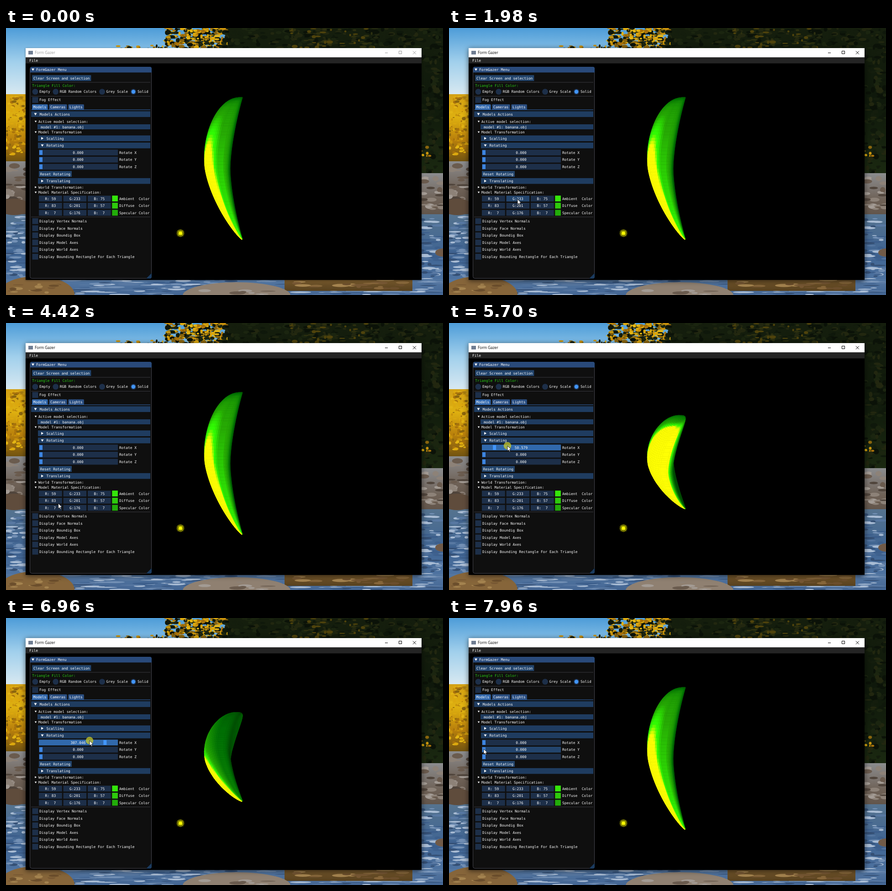
Animation of 957 by 585 pixels, one loop 8 s. Source, as an HTML page with a canvas:

```html
<!DOCTYPE html>
<html lang="en">
<head>
<meta charset="utf-8">
<title>Form Gazer</title>
<style>
html, body { margin: 0; width: 100%; height: 100%; overflow: hidden; background: #000; }
canvas, svg { position: absolute; left: 0; top: 0; }
text { font: 7.89px "DejaVu Sans Mono", monospace; white-space: pre; }
text.title { font: 8.2px "Open Sans", sans-serif; }
.window { filter: drop-shadow(0 1px 2px rgba(0,0,0,.4)); }
.window.on { filter: drop-shadow(0 2px 6px rgba(0,0,0,.6)); }
</style>
</head>
<body>
<canvas id="photo" width="957" height="585"></canvas>
<svg id="ui" width="957" height="585"></svg>
<canvas id="scene" width="957" height="585"></canvas>
<script>
const LOOP = 8000, TICK = 30, LAG = 120, FOCUS = 1400;
const PRESS = 5200, RELEASE = 7720, DEG = .457;
const $ = id => document.getElementById(id);
const clamp = (v, lo, hi) => Math.max(lo, Math.min(hi, v));

// ---------- landscape behind the window ----------
const bg = $('photo').getContext('2d');
let seed = 7;
const rnd = () => (seed = seed * 16807 % 2147483647) / 2147483647;

function fade(x, y, w, h, ...colors) {
  const grad = bg.createLinearGradient(0, y, 0, y + h);
  colors.forEach((c, i) => grad.addColorStop(i / (colors.length - 1), c));
  bg.fillStyle = grad;
  bg.fillRect(x, y, w, h);
}
function blob(x, y, rx, ry, color) {
  bg.fillStyle = color;
  bg.beginPath();
  bg.ellipse(x, y, rx, ry, 0, 0, 7);
  bg.fill();
}
// fills an area with random blobs, about `cover` times over
function scatter(x, y, w, h, rx, ry, colors, cover = 1) {
  for (let n = cover * w * h / (rx * ry * 3); n > 0; n--)
    blob(x + rnd() * w, y + rnd() * h, rx * (.3 + rnd()), ry * (.3 + rnd()),
      colors[Math.floor(rnd() * colors.length)]);
}
function drawPhoto() {
  const gold = ['#c8920c', '#dca80e', '#a8720c', '#e2b414', '#8a650e'];
  const dark = ['#0b1208', '#141d0d', '#1b2510', '#0f180b', '#222710'];
  const stone = ['#8d8278', '#a39b94', '#6a5b4e', '#50453c'];
  const water = ['#7390b5', '#3d5f8c', '#a9bcd4', '#5878a2', '#344f74'];
  const brown = ['#a4834f', '#765733', '#86663a', '#6b4e2c'];
  bg.filter = 'blur(.7px)';

  fade(0, 0, 957, 150, '#4d9cd8', '#a2d0ec', '#dbeaf1');
  fade(480, 0, 477, 325, '#151e0d', '#0f190b', '#1b2911');
  scatter(350, 0, 135, 46, 6, 4, gold.concat(dark), 3);
  scatter(385, 0, 90, 28, 5, 3, gold, .6);
  scatter(235, 38, 110, 8, 4, 3, gold.concat(dark), .8);
  scatter(480, 0, 477, 44, 7, 4, dark, 1);
  scatter(620, 0, 190, 44, 6, 3, ['#4f430c', '#2d3010'], .4);
  scatter(910, 44, 47, 275, 7, 5, dark, 1);
  scatter(910, 252, 18, 30, 4, 3, gold, .5);

  fade(0, 145, 44, 150, '#d2a015', '#deb010', '#b9800c', '#6d5010');
  scatter(0, 150, 44, 130, 4, 3, gold, .8);
  for (const x of [0, 909]) {
    fade(x, x ? 318 : 292, 48, 120, '#8b8c8e', '#6e6156', '#56493f');
    scatter(x, x ? 325 : 300, 48, 75, 11, 5, stone, 1);
    fade(x, 408, 48, 177, '#55738f', '#3f6493', '#587ca8');
    scatter(x, 412, 48, 170, 12, 2.5, water, .8);
  }
  blob(18, 392, 34, 18, '#5f4c3c');
  blob(956, 492, 16, 9, '#705a48');

  fade(0, 550, 957, 35, '#5578a2', '#446694');
  scatter(130, 552, 827, 33, 22, 2, water, .9);
  blob(66, 584, 84, 40, '#86653a');
  scatter(5, 560, 120, 25, 12, 3, brown, .7);
  fade(610, 550, 280, 26, '#76582c', '#57411f');
  scatter(620, 552, 260, 22, 16, 3, brown, .6);
  blob(505, 586, 118, 29, '#8f8071');
  scatter(430, 568, 150, 17, 14, 3, stone, .4);
}

// ---------- window and panel ----------
const FRAME = '#1d2f49', HOVER = '#23456d', ACTIVE = '#3169ac', HEADER = '#1f3c60', BLUE = '#4296fa';
const hot = [], chrome = [];

function add(tag, attrs, content) {
  const e = document.createElementNS('http://www.w3.org/2000/svg', tag);
  for (const k in attrs) e.setAttribute(k, attrs[k]);
  if (content) e.textContent = content;
  $('ui').append(e);
  return e;
}
const rect = (x, y, width, height, fill, more) => add('rect', { x, y, width, height, fill, ...more });
const label = (s, x, cy, fill = '#fff', more) => add('text', { x, y: cy + 2.8, fill, ...more }, s);
const centred = (s, x, cy) => label(s, x, cy, '#fff', { 'text-anchor': 'middle' });
const line = (d, stroke) => add('path', { d, stroke, fill: 'none' });
const rule = y => line(`M55 ${y}H316`, '#38383f');

function arrow(x, cy, open, r = 3) {
  const d = open ? `M${x - r} ${cy - r * .8}h${2 * r}l${-r} ${r * 1.7}z`
                 : `M${x - r * .8} ${cy - r}v${2 * r}l${r * 1.7} ${-r}z`;
  add('path', { d, fill: '#fff' });
}
function field(x, cy, w, base = FRAME, over = HOVER) {
  const e = rect(x, cy - 6.4, w, 12.8, base);
  hot.push({ e, x, y: cy - 6.4, w, base, over });
  return e;
}
function header(s, x, cy, open) {
  rect(x, cy - 6.3, 316 - x, 12.6, HEADER);
  arrow(x + 9.5, cy, open);
  label(s, x + 18.5, cy);
}
function node(s, cy, open) {
  arrow(65, cy, open, 2.2);
  label(s, 71, cy);
}
function check(s, cy) {
  field(57.5, cy, 13);
  label(s, 73, cy);
}
function button(s, x, cy, w) {
  field(x, cy, w, HOVER, ACTIVE);
  label(s, x + 2.7, cy);
}

const frame = rect(43, 44, 867, 508, '#000', { class: 'window' });
rect(43, 44, 867, 20.5, '#fff');
rect(49, 50, 10, 8, '#6f7d92');
chrome.push([label('Form Gazer', 63, 54, '#999', { class: 'title' }), 'fill']);
for (const d of ['M830 54.5h6', 'M860.5 50.5h6v6h-6z', 'M891 50.5l7 7M898 50.5l-7 7'])
  chrome.push([line(d, '#999'), 'stroke']);
rect(43, 64.5, 867, 13, '#242424');
label('File', 51, 71);

rect(52.5, 85.5, 266, 463, '#0f0f0f', { rx: 4, stroke: '#45454e' });
add('path', { d: 'M53 97.5V89q0-4 4-4H315q4 0 4 4V97.5z', fill: '#294a7a' });
add('path', { d: 'M319 537V545q0 4-4 4H307z', fill: '#1b3b5f' });
arrow(59, 91.2, true);
label('FormGazer Menu', 66, 91.2);
button('Clear Screen and selection', 57.3, 109.7, 129);
rule(119);
label('Triangle Fill Color:', 57.3, 126, '#2ad411');
let cx = 64;
for (const s of ['Empty', 'RGB Random Colors', 'Grey Scale', 'Solid']) {
  add('circle', { cx, cy: 139.6, r: 6.4, fill: FRAME });
  if (s === 'Solid') add('circle', { cx, cy: 139.6, r: 4.3, fill: BLUE });
  label(s, cx + 9, 139.6);
  cx += s.length * 4.75 + 21;
}
rule(149.5);
check('Fog Effect', 157.6);
let tabX = 57;
for (const s of ['Models', 'Cameras', 'Lights']) {
  const w = s.length * 4.75 + 6;
  rect(tabX, 167.3, w, 12, s === 'Models' ? '#3369ad' : '#2a4e81', { rx: 1.5 });
  label(s, tabX + 2.7, 173.4);
  tabX += w + 2.8;
}
line('M55 179.2H316', '#3369ad');
header('Models Actions', 55, 188.7, true);
node('Active model selection:', 205, true);
rect(69, 211, 247, 11, HEADER);
label('model #1: banana.obj', 76, 216.8);
node('Model Transformation', 228.3, true);

const ROW = 15.6;
header('Scalling', 70, 241.7, false);
header('Rotating', 70, 257.3, true);
const [spin] = ['X', 'Y', 'Z'].map((axis, i) => {
  const cy = 272.8 + i * ROW;
  const box = field(72, cy, 173);
  const grab = rect(73, cy - 5.2, 7, 10.4, '#3d85e0');
  label('Rotate ' + axis, 248, cy);
  return { box, grab, value: centred('0.000', 158, cy) };
});
button('Reset Rotating', 72, 319.7, 72);
header('Translating', 70, 335.2, false);
node('World Transformation:', 348.8, false);
node('Model Material Specification:', 360.2, true);
[['R: 59', 'G:233', 'B: 75', 'Ambient  Color', '#34e60a'],
 ['R: 83', 'G:201', 'B: 57', 'Diffuse  Color', '#2dca0c'],
 ['R:  7', 'G:176', 'B:  7', 'Specular Color', '#22ac0a']].forEach((row, i) => {
  const cy = 373.8 + i * ROW;
  for (let c = 0; c < 3; c++) {
    field(72 + c * 53.5, cy, 50.7);
    centred(row[c], 97.3 + c * 53.5, cy);
  }
  rect(232.3, cy - 6.6, 12.6, 12.8, row[4]);
  label(row[3], 248, cy);
});
rule(414);
['Vertex Normals', 'Face Normals', 'Boundig Box', 'Model Axes', 'World Axes', 'Bounding Rectangle For Each Triangle']
  .forEach((s, i) => check('Display ' + s, 423.1 + i * ROW));

// ---------- pointer: time, x, y at the turning points ----------
const path = [
  [500, 794, 505], [1050, 90, 250], [1500, 116, 372], [1980, 150, 375], [2500, 95, 378],
  [3200, 204, 388], [3450, 206, 404], [4100, 102, 404], [4420, 115, 395], [4900, 76, 271],
  [5400, 77, 270], [5580, 99.1146, 270], [5700, 128, 269], [5970, 156, 268], [6210, 224.2042, 267],
  [6330, 251, 266], [6690, 258, 267], [7230, 107.9521, 270], [7350, 93, 270], [7650, 53, 272],
  [7720, 53, 272], [7860, 76, 287], [LOOP, 76, 287]
];
function pointer(t) {
  const i = path.findIndex(p => p[0] > t);
  if (!i) return [-99, -99];
  const a = path[i - 1], b = path[i], k = (t - a[0]) / (b[0] - a[0]);
  return [a[1] + (b[1] - a[1]) * k, a[2] + (b[2] - a[2]) * k];
}

// ---------- banana: horizontal sections, round on the left, boxy on the right ----------
const MID = 307.5, RINGS = 64, SIDES = 44;
const bend = (v, p) => Math.sign(v) * Math.abs(v) ** p;

function vertex(i, j) {
  const v = (1 - Math.cos(Math.PI * i / RINGS)) / 2, a = j / SIDES * 2 * Math.PI;
  const inner = 491 + 27 * Math.abs(2 * v - 1) ** 1.6;
  const half = 1 + 61.5 * v ** .4 * (1 - v) ** .8;
  const p = Math.cos(a) > 0 ? .4 : 1;
  return [inner - half + half * bend(Math.cos(a), p), 311 * v - 155.5, half * bend(Math.sin(a), p)];
}
const quads = [];
for (let i = 0; i < RINGS; i++)
  for (let j = 0; j < SIDES; j++) {
    const p = [vertex(i, j), vertex(i, j + 1), vertex(i + 1, j + 1), vertex(i + 1, j)];
    const [u, v] = [0, 1].map(k => p[k + 2].map((c, m) => c - p[k][m]));
    const n = [u[1] * v[2] - u[2] * v[1], u[2] * v[0] - u[0] * v[2], u[0] * v[1] - u[1] * v[0]];
    const a = (j + .5) / SIDES * 2 * Math.PI;
    const size = Math.hypot(...n) * Math.sign(n[0] * Math.cos(a) + n[2] * Math.sin(a)) || 1;
    quads.push({ p, n: n.map(c => c / size) });
  }

const LIGHT = [-.62, .62, .48];
function shade(n) {
  const lit = n.reduce((sum, c, k) => sum + c * LIGHT[k], 0);
  const red = 12 + 60 * lit + 2800 * Math.max(0, lit - .64);
  const green = 130 + 90 * lit + 400 * Math.max(0, lit - .45);
  return `rgb(${clamp(red, 0, 255)},${clamp(green, 0, 255)},4)`;
}

const g = $('scene').getContext('2d');

function drawBanana(angle) {
  const c = Math.cos(angle * Math.PI / 180), s = Math.sin(angle * Math.PI / 180);
  const turn = ([x, y, z]) => [x, y * c + z * s, z * c - y * s];
  const seen = [];
  for (const q of quads) {
    const n = turn(q.n);
    if (n[2] <= 0) continue;
    const p = q.p.map(turn);
    seen.push({ p, z: p[0][2] + p[2][2], color: shade(n) });
  }
  seen.sort((a, b) => a.z - b.z);
  g.lineWidth = .6;
  for (const { p, color } of seen) {
    g.fillStyle = g.strokeStyle = color;
    g.beginPath();
    p.forEach(v => g.lineTo(v[0], v[1] + MID));
    g.closePath();
    g.fill();
    g.stroke();
  }
}
function drawSun() {
  g.strokeStyle = '#ff0';
  g.lineWidth = 1.1;
  g.beginPath();
  for (let a = 0; a < 6.2; a += Math.PI / 8) {
    g.moveTo(382, 449.5);
    g.lineTo(382 + 8.5 * Math.cos(a), 449.5 + 8.5 * Math.sin(a));
  }
  g.stroke();
}
const ARROW = new Path2D('M0 0V11.4L2.6 9L4.3 12.9L6.1 12.1L4.5 8.3L8 8.1Z');
function drawPointer([x, y], pressed) {
  g.save();
  g.translate(x, y);
  if (pressed) {
    g.fillStyle = 'rgba(205,205,40,.72)';
    g.beginPath();
    g.arc(0, 0, 8.3, 0, 7);
    g.fill();
  }
  g.fillStyle = '#fff';
  g.strokeStyle = '#000';
  g.lineWidth = .8;
  g.fill(ARROW);
  g.stroke(ARROW);
  g.restore();
}

// ---------- one picture at time t ----------
function draw(t) {
  const focused = t >= FOCUS, dragging = t >= PRESS && t < RELEASE;
  frame.setAttribute('class', focused ? 'window on' : 'window');
  for (const [e, attr] of chrome) e.setAttribute(attr, focused ? '#000' : '#999');

  const [hx, hy] = pointer(t - 80);
  for (const h of hot) {
    const inside = !dragging && hx >= h.x && hx < h.x + h.w && hy >= h.y && hy < h.y + 12.8;
    h.e.setAttribute('fill', inside ? h.over : h.base);
  }
  // the slider follows the pointer with a delay
  const held = t >= PRESS && t - LAG < RELEASE;
  const angle = held ? clamp((pointer(t - LAG)[0] - 76) / DEG, 0, 360) : 0;
  if (dragging) spin.box.setAttribute('fill', ACTIVE);
  spin.grab.setAttribute('fill', dragging ? BLUE : '#3d85e0');
  spin.grab.setAttribute('x', 73 + angle * DEG);
  spin.value.textContent = angle.toFixed(3);

  g.clearRect(0, 0, 957, 585);
  drawBanana(angle);
  drawSun();
  drawPointer(pointer(t), dragging || Math.abs(t - FOCUS) < 60);
}

drawPhoto();
const start = performance.now();
let shown = -1;
function loop() {
  const t = Math.floor(((performance.now() - start) % LOOP + 5) / TICK) * TICK;
  if (t !== shown) draw(shown = Math.min(t, LOOP - 1));
  requestAnimationFrame(loop);
}
loop();
</script>
</body>
</html>
```
